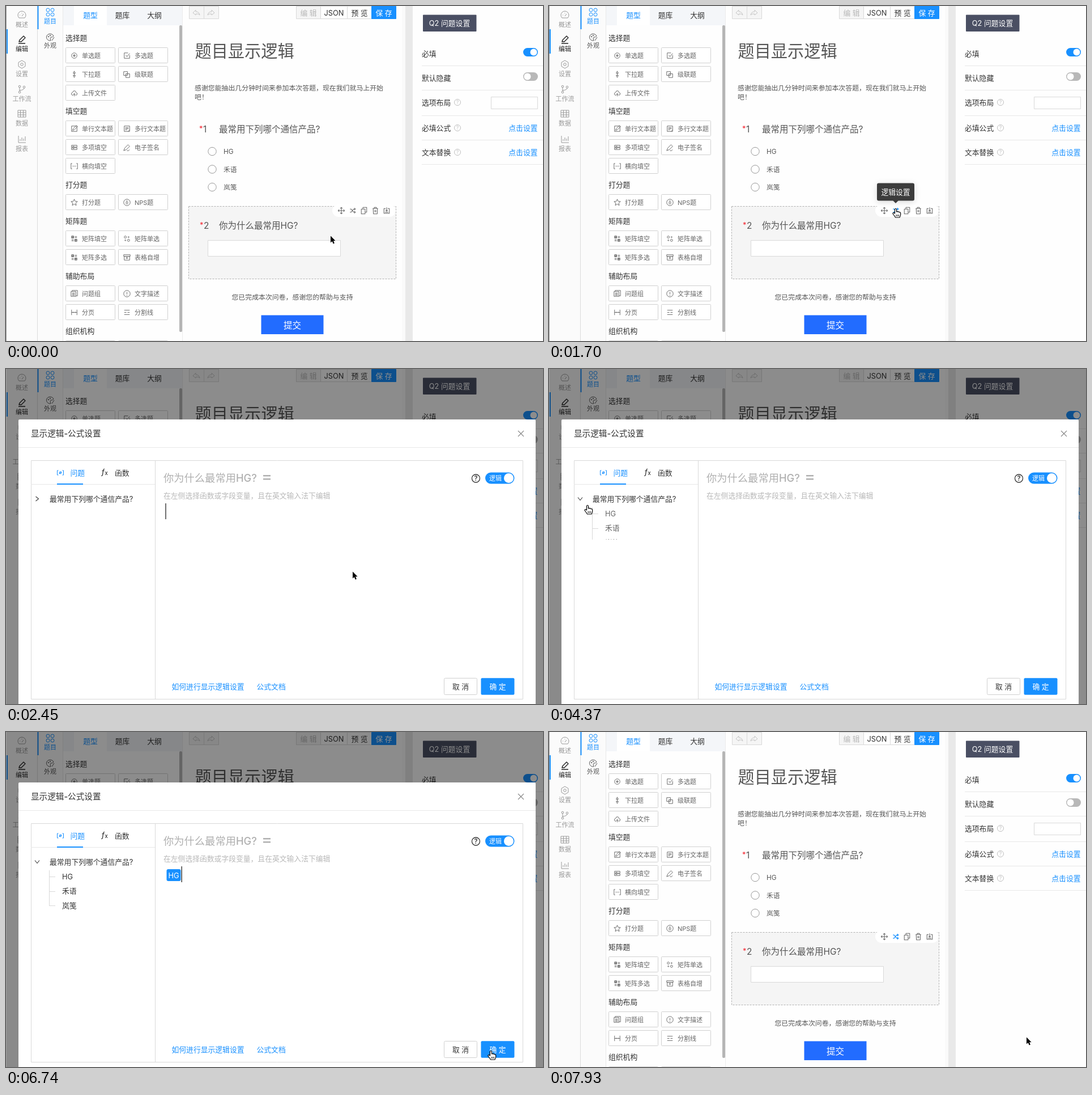
An HTML page with a canvas for the animation above (8000 ms loop, 948 by 591 pixels).

```html
<!DOCTYPE html>
<html lang="zh-CN">
<head>
<meta charset="utf-8">
<style>
  html, body { margin: 0; width: 100%; height: 100%; overflow: hidden; background: #fff; }
  canvas { display: block; width: 948px; height: 591px; }
</style>
</head>
<body>
<canvas id="stage"></canvas>
<script>
const LOOP = 8000, W = 948, H = 591;
const BLUE = '#1890ff', INK = '#333', SOFT = '#666', RULE = '#e8e8e8', EDGE = '#d0d0d0';
const FONT = '"Inter", "Noto Sans CJK SC", "Noto Sans CJK", sans-serif';
const PRODUCTS = ['HG', '禾语', '岚笺'];
const Q1 = '最常用下列哪个通信产品?', Q2 = `你为什么最常用${PRODUCTS[0]}?`;

const canvas = document.getElementById('stage');
const ctx = canvas.getContext('2d');
const ratio = window.devicePixelRatio || 1;
canvas.width = W * ratio;
canvas.height = H * ratio;

// ---------- drawing helpers ----------
function text(s, x, y, { size = 12.8, color = INK, align = 'left', weight = 400, style = 'normal' } = {}) {
  ctx.font = `${style} ${weight} ${size}px ${FONT}`;
  ctx.fillStyle = color;
  ctx.textAlign = align;
  ctx.fillText(s, x, y + size * 0.37);
}
function box(x, y, w, h, fill, stroke, radius = 0) {
  ctx.beginPath();
  ctx.roundRect(x, y, w, h, radius);
  if (fill) { ctx.fillStyle = fill; ctx.fill(); }
  if (stroke) { ctx.strokeStyle = stroke; ctx.lineWidth = 1; ctx.stroke(); }
}
const hline = (x, y, w, color = RULE) => box(x, y, w, 1, color);
const vline = (x, y, h, color = RULE) => box(x, y, 1, h, color);
function shape(d, x, y, { stroke, fill, width = 1, scale = 1 } = {}) {
  const path = new Path2D(d);
  ctx.save();
  ctx.translate(x, y);
  ctx.scale(scale, scale);
  ctx.lineWidth = width;
  ctx.lineJoin = 'round';
  if (fill) { ctx.fillStyle = fill; ctx.fill(path); }
  if (stroke) { ctx.strokeStyle = stroke; ctx.stroke(path); }
  ctx.restore();
}
const ring = (x, y, r) => `M${x - r} ${y}a${r} ${r} 0 1 0 ${2 * r} 0a${r} ${r} 0 1 0 ${-2 * r} 0`;
const rect = (x, y, w, h = w) => `M${x} ${y}h${w}v${h}h${-w}z`;
const disc = (x, y, r, fill) => shape(ring(0, 0, r), x, y, { fill });
function toggle(x, y, w, h, on) {
  box(x, y, w, h, on ? BLUE : '#b8b8b8', null, h / 2);
  disc(on ? x + w - h / 2 : x + h / 2, y + h / 2, h / 2 - 1.5, '#fff');
}
function help(x, y, r, color) {
  shape(ring(0, 0, r), x, y, { stroke: color, width: r > 6 ? 1.3 : 1 });
  text('?', x, y, { size: r * 1.6, color, align: 'center', weight: r > 6 ? 600 : 400 });
}

const ICON = {
  gauge: 'M-5 5A7 7 0 1 1 5 5ZM0 2L3-2M-4 0h1M0-4v1',
  pen: 'M-5 4L-4 1L3-6L6-3L-1 4ZM-6 7H6',
  gear: 'M0-7L6-3.5V3.5L0 7L-6 3.5V-3.5Z' + ring(0, 0, 2.3),
  branch: ring(-4, -5, 1.8) + ring(-4, 5, 1.8) + ring(4, -4, 1.8) + 'M-4-3V3M4-2Q4 1-4 2',
  table: rect(-7, -6, 14, 12) + 'M-7-2H7M-7 2H7M-2.5-6V6M2.5-6V6',
  chart: 'M-6-6V6H7M-3 3V0M0 3V-3M3 3V-1M6 3V-5',
  four: ring(-4, -4, 3) + ring(4, -4, 3) + ring(-4, 4, 3) + ring(4, 4, 3),
  palette: 'M1 6A6.5 6 0 1 1 6-2Q5 0 2 0T1 6' + ring(-3, -1, .8) + ring(0, -3, .8) + 'M7 0L3 6',
  radio: ring(0, 0, 5) + ring(0, 0, 1.7) + ring(0, 0, .8),
  check: 'M5-1V5H-5V-5H2M-2-1L0 2L5-4',
  sort: 'M0-6L2-2H-2ZM0 6L2 2H-2ZM0-2V2',
  cascade: rect(-6, -5, 7) + rect(-2, -1, 7),
  cloud: 'M-2 4H-4Q-6 3-5 0Q-4-1-3-1Q-2-5 1-4Q3-4 3-1Q7 0 5 3Q4 4 2 4M0 6V1M-2 3L0 1L2 3',
  edit: rect(-5, -5, 10) + 'M-3 3L-2 0L4-6L6-4L0 2Z',
  note: rect(-5, -5, 10) + 'M-3-2H3M-3 0H3M-3 2H0M2 5L5 2',
  fields: rect(-5, -4, 10, 3.5) + rect(-5, .5, 10, 3.5) + 'M-3-2H0M-3 2H0',
  sign: 'M-6 6L-4 1L2-5L5-2L-1 4ZM0 6H3L5 4',
  dots: 'M-4-5H-6V5H-4M4-5H6V5H4M-3 0h1.5M-.7 0h1.5M1.7 0h1.5',
  star: 'M0-6L1.7-2L6-1.6L2.7 1.2L3.7 5.5L0 3.2L-3.7 5.5L-2.7 1.2L-6-1.6L-1.7-2Z',
  dial: ring(0, 0, 6) + ring(0, 1, 1.8) + 'M0-4V-1',
  cells: rect(-5, -5, 4) + rect(-4, -4, 2) + rect(1, 1, 4) + rect(2, 2, 2) + 'M1-4H5M1-2H5M-5 2H-1M-5 4H-1',
  circles: ring(-3, -3, 2) + ring(3, 3, 2) + ring(3, -3, 1) + ring(-3, 3, 1),
  rows: rect(-6, -5, 12, 3) + rect(-5, -2, 10, 7) + 'M-2 1H2M0-1V3',
  group: rect(-6, -4, 9) + 'M-4-4V-6H6V4H3M-4-1H1M-4 1H1M-4 3H1',
  info: ring(0, 0, 6) + 'M0-3V1M0 2.5V4',
  page: 'M-5-5V5M5-5V5M-5 0H5M-2-1V1M2-1V1',
  lines: 'M-5-4H5M-5 0H-1M1 0H5M-5 4H5',
  move: 'M-6 0H6M0-6V6M-4-2L-6 0L-4 2M4-2L6 0L4 2M-2-4L0-6L2-4M-2 4L0 6L2 4',
  shuffle: 'M-5-3H-3L2 3H5M-5 3H-3L2-3H5M3-5L5-3L3-1M3 1L5 3L3 5',
  copy: rect(-5, -3, 7, 9) + 'M-2-3V-6H5V3H2',
  trash: 'M-5-4H5M-2-4V-6H2V-4M-4-4L-3.5 6H3.5L4-4M-1-1V3M1-1V3',
  store: 'M-2-4H-5V5H5V-4H2M0-6V1M-2-1L0 1L2-1M-3 3H3',
  back: 'M-1-5L-6 0L-1 4V2Q4 1 6 4Q5-2-1-2Z',
  forward: 'M1-5L6 0L1 4V2Q-4 1-6 4Q-5-2 1-2Z',
  brackets: 'M-3.5-4H-5.5V4H-3.5M3.5-4H5.5V4H3.5M2-2L-2 2' + ring(0, 0, 1.8),
  cross: 'M-5-5L5 5M5-5L-5 5',
  right: 'M-2.5-4L2.5 0L-2.5 4',
  down: 'M-4-2.5L0 2.5L4-2.5',
};
const ARROW = 'M0 0V14L3.2 11L5.5 16.2L8 15.2L5.8 10.2H10Z';
const HAND = 'M-1.5 9V1.5Q0-1 1.5 1.5V6Q3 4.5 4 6.2Q5.5 5 6.3 7Q8.5 6 8.7 9V11Q8.5 13 7 16H-.5L-2 13.5L-5 9.5Q-5 7-3 8Z';

// ---------- editor page ----------
const NAV = [['gauge', '概述', 16], ['pen', '编辑', 59], ['gear', '设置', 103],
  ['branch', '工作流', 147], ['table', '数据', 190], ['chart', '报表', 235]];
const GROUPS = [
  [56, '选择题', 'radio 单选题,check 多选题,sort 下拉题,cascade 级联题,cloud 上传文件'],
  [185, '填空题', 'edit 单行文本题,note 多行文本题,fields 多项填空,sign 电子签名,dots 横向填空'],
  [315, '打分题', 'star 打分题,dial NPS题'],
  [379, '矩阵题', 'cells 矩阵填空,circles 矩阵单选,cells 矩阵多选,rows 表格自增'],
  [476, '辅助布局', 'group 问题组,info 文字描述,page 分页,lines 分割线'],
  [573, '组织机构', 'group 部门,info 成员'],
];

function drawNavigation() {
  box(0, 0, 100, H, '#fbfbfb');
  vline(0, 0, H, '#a0a0a0');
  vline(55, 0, H, '#dcdcdc');
  vline(100, 0, H, RULE);
  box(1, 41, 2, 43, BLUE);
  box(55.5, 0, 2, 41, BLUE);
  NAV.forEach(([icon, label, y], i) => {
    const color = i === 1 ? '#222' : '#999';
    shape(ICON[icon], 28, y, { stroke: color, width: i === 1 ? 1.4 : 1 });
    text(label, 28, y + 17, { size: 11, color, align: 'center' });
  });
  shape(ICON.four, 78, 11, { stroke: BLUE });
  text('题目', 78, 27, { size: 11, color: BLUE, align: 'center' });
  shape(ICON.palette, 78, 55, { stroke: '#555' });
  text('外观', 78, 70, { size: 11, color: '#555', align: 'center' });
}

function drawPalette() {
  box(101, 0, 210, 34, '#f4f6f9');
  box(120, 0, 58, 34, '#fff');
  ['题型', '题库', '大纲'].forEach((s, i) =>
    text(s, 149 + i * 56.5, 16, { align: 'center', color: i ? INK : BLUE }));
  for (const [y, title, items] of GROUPS) {
    text(title, 105, y);
    items.split(',').forEach((item, i) => {
      const [icon, label] = item.split(' ');
      const x = 105.5 + (i % 2) * 93, top = y + 17.5 + (i >> 1) * 33;
      box(x, top, 87, 27, '#fff', EDGE, 1);
      shape(ICON[icon], x + 15, top + 14, { stroke: SOFT, scale: 0.95 });
      text(label, x + 28.5, top + 14.5, { size: 11, color: SOFT });
    });
  }
  box(306, 34, 5, 541, '#b5b5b5', null, 2);
  vline(311, 0, H, '#ececec');
}

function drawForm(linked) {
  box(323.5, .5, 26, 22, '#f5f5f5', '#d9d9d9');
  box(349.5, .5, 26, 22, '#f5f5f5', '#d9d9d9');
  shape(ICON.back, 336, 12, { stroke: '#c4c4c4' });
  shape(ICON.forward, 362, 12, { stroke: '#c4c4c4' });
  const tools = [[512, 43, '编 辑'], [555, 47, 'JSON'], [602, 43, '预 览'], [645, 43, '保 存']];
  tools.forEach(([x, w, label], i) => {
    box(x + .5, .5, w, 22, ['#f5f5f5', '#fff', '#fff', BLUE][i], i === 3 ? BLUE : '#d9d9d9');
    text(label, x + w / 2 + .5, 12, { align: 'center', color: ['#b8b8b8', INK, INK, '#fff'][i] });
  });

  text('题目显示逻辑', 333.5, 79, { size: 29.2, color: '#555' });
  text('感谢您能抽出几分钟时间来参加本次答题，现在我们就马上开始', 333, 145, { size: 11.9, color: '#555' });
  text('吧！', 333, 161, { size: 11.9, color: '#555' });

  const question = (n, label, x, y) => {
    text('*', x, y - .5, { size: 12.8, color: '#f5222d' });
    text(n, x + 7, y, { size: 15.5, color: '#555' });
    text(label, 376, y + .5, { size: 15.5, color: '#555' });
  };
  question('1', Q1, 341, 217);
  PRODUCTS.forEach((name, i) => {
    const y = 256.5 + i * 31.5;
    shape(ring(0, 0, 7.2), 364, y, { fill: '#fff', stroke: '#999' });
    text(name, 384, y + .5, { size: 11.8, color: '#555' });
  });

  ctx.setLineDash([3, 2]);
  box(322.5, 353.5, 366, 128, '#f5f5f5', '#b0b0b0');
  ctx.setLineDash([]);
  box(576, 350, 112, 22, '#fff', null, 11);
  ['move', 'shuffle', 'copy', 'trash', 'store'].forEach((icon, i) => {
    const active = i === 1 && linked;
    shape(ICON[icon], 592 + i * 20, 361, { stroke: active ? BLUE : '#666', width: active ? 1.4 : 1.1, scale: .95 });
  });
  question('2', Q2, 342, 387);
  box(356.5, 413.5, 234, 28, '#fff', '#d9d9d9');

  text('您已完成本次问卷，感谢您的帮助与支持', 505.5, 514, { size: 11.9, color: '#555', align: 'center' });
  box(450.5, 545.5, 110, 33.5, '#226cff');
  text('提交', 505.5, 563, { size: 15.5, color: '#fff', align: 'center' });
}

function drawSettings() {
  box(699, 0, 6, H, '#fafafa');
  box(705, 0, 13, H, '#e9e9e9');
  box(736, 15.5, 94.5, 29.5, '#4a4f63', null, 1);
  text('Q2 问题设置', 783, 30.5, { color: '#fff', align: 'center' });
  ['必填', '默认隐藏', '选项布局', '必填公式', '文本替换'].forEach((label, i) => {
    const y = [84, 127, 170, 215, 258][i];
    text(label, 734, y);
    hline(734, [105, 148, 193, 236, 279][i], 214);
    if (i > 1) help(797, y, 5.5, '#c0c0c0');
    if (i > 2) text('点击设置', 938.5, y, { color: BLUE, align: 'right' });
  });
  toggle(913, 74, 26, 15, true);
  toggle(913, 117, 26, 15, false);
  box(856.5, 160.5, 82, 21, '#fff', '#d9d9d9');
}

// ---------- dialog ----------
function drawTree(t) {
  const open = t >= 4370;
  shape(open ? ICON.down : ICON.right, 55, 229, { stroke: '#444', width: 1.2 });
  text(Q1, 77, 229.5);
  if (t < 4220) return;
  const bottom = t < 4370 ? 262 : t < 4520 ? 301 : 320;
  ctx.save();
  ctx.beginPath();
  ctx.rect(44, 240, 218, bottom - 240);
  ctx.clip();
  vline(76, 244, 63, '#d9d9d9');
  PRODUCTS.forEach((name, i) => {
    const y = 255 + i * 25.6;
    hline(77, Math.round(y), 10, '#d9d9d9');
    text(name, 99, y, { color: t < 4520 ? '#666' : INK });
  });
  ctx.restore();
}

// The caret blinks every 530 ms while the editor holds focus.
function caretVisible(t) {
  const since = t >= 5260 ? t - 5260 : t < 3920 ? t - 2300 : -1;
  return since >= 0 && t < 6890 && Math.floor(since / 530) % 2 === 0;
}

function drawDialog(t) {
  box(22, 89, 913, 516, '#fff', null, 2);
  text('显示逻辑-公式设置', 44, 114, { size: 14.6, weight: 500 });
  shape(ICON.cross, 909, 114, { stroke: '#888', width: 1.1 });
  hline(22, 138, 913);
  box(44.5, 161.5, 868, 421, null, '#d9d9d9');
  vline(263, 162, 420, '#d9d9d9');

  shape(ICON.brackets, 96, 183, { stroke: BLUE });
  text('问题', 113.5, 183, { color: BLUE });
  text('f', 169, 181.5, { size: 12, weight: 500, style: 'italic' });
  text('x', 174.5, 183.5, { size: 9.5, weight: 500 });
  text('函数', 192, 183);
  hline(44, 203, 219);
  // The tab underline grows to full width once the dialog is open.
  box(90, 202, t < 2450 ? 17 : 46, 2, BLUE);
  drawTree(t);

  text(Q2, 278, 192, { size: 18.3, color: '#b0b0b0', weight: 500 });
  box(454, 187, 13, 2.5, '#b0b0b0');
  box(454, 193, 13, 2.5, '#b0b0b0');
  text('在左侧选择函数或字段变量，且在英文输入法下编辑', 278, 223, { color: '#b8b8b8' });
  help(829.5, 193, 7, INK);
  toggle(846, 182.5, 51.5, 20, true);
  text('逻辑', 853, 193, { size: 11, color: '#fff' });

  const filled = t >= 5260;
  if (filled) {
    box(283.5, 242, 25, 21, BLUE, null, 3);
    text(PRODUCTS[0], 296, 253, { color: '#fff', align: 'center' });
  }
  if (caretVisible(t)) box(filled ? 309.5 : 281.3, 237, 1.4, 28, '#333');

  text('如何进行显示逻辑设置', 292.5, 560, { color: BLUE });
  text('公式文档', 442.5, 560, { color: BLUE });
  box(773.5, 545.5, 58, 29, '#fff', '#d0d0d0', 2);
  text('取 消', 802.5, 560.5, { align: 'center' });
  box(838.5, 545.3, 59, 29.4, t >= 6890 ? '#40a9ff' : BLUE, null, 2);
  text('确 定', 868, 560.5, { color: '#fff', align: 'center' });
}

// Scale, dialog opacity and mask opacity; the dialog zooms around the clicked icon.
function dialogState(t) {
  if (t < 2300 || t >= 7630) return null;
  if (t < 2450) return [.871, .84, .19];
  if (t < 7340) return [1, 1, .45];
  return t < 7490 ? [.88, .6, .32] : [.5, .15, .1];
}

function drawTooltip(alpha) {
  ctx.save();
  ctx.globalAlpha = alpha;
  ctx.shadowColor = 'rgba(0,0,0,.15)';
  ctx.shadowBlur = 12 * ratio;
  ctx.shadowOffsetY = 2 * ratio;
  box(579, 312.5, 66, 31, '#3c3c3c', null, 3);
  ctx.shadowColor = 'transparent';
  shape('M-5 0H5L0 5Z', 612, 343, { fill: '#3c3c3c' });
  text('逻辑设置', 612, 328, { color: '#fff', align: 'center' });
  ctx.restore();
}

// ---------- pointer ----------
const POINTER = [[350, 573, 405], [650, 365, 397], [1250, 655, 360], [1400, 624, 359], [1550, 612, 357],
  [2890, 612, 357], [3920, 56, 235], [4220, 56, 235], [4370, 68, 240], [4810, 98, 252], [5410, 98, 252],
  [6590, 808, 549], [6740, 856, 562], [7040, 868, 564], [7780, 868, 564], [7930, 843, 538]];

function drawPointer(t) {
  const next = POINTER.findIndex(k => k[0] > t);
  const b = POINTER[next < 0 ? POINTER.length - 1 : next];
  const a = next > 0 ? POINTER[next - 1] : b;
  const p = a === b ? 0 : (t - a[0]) / (b[0] - a[0]);
  const e = p * p * (3 - 2 * p);
  const x = a[1] + (b[1] - a[1]) * e, y = a[2] + (b[2] - a[2]) * e;
  const hand = (t >= 1400 && t < 2300) || (t >= 3920 && t < 5700) || (t >= 6740 && t < 7340);
  if (hand) {
    shape(HAND, x, y, { fill: '#fff', stroke: '#000', width: 1.2 });
    shape('M1 11V14M3.2 11V14M5.4 11V14', x, y, { stroke: '#000', width: .9 });
  } else {
    shape(ARROW, x, y + .5, { stroke: '#fff', width: 2, scale: .86 });
    shape(ARROW, x, y + .5, { fill: '#000', scale: .86 });
  }
}

// ---------- timeline: first step, last step, number of steps ----------
const RUNS = [[500, 1400, 7], [1550, 1700, 2], [2300, 2740, 4], [3040, 3920, 7], [4220, 4810, 5],
  [5260, 5260, 1], [5560, 6590, 8], [6740, 7040, 3], [7340, 7630, 3], [7930, 7930, 1]];

function heldTime(t) {
  const run = RUNS.filter(r => r[0] <= t).pop();
  if (!run) return 0;
  const [start, end, count] = run;
  if (t >= end) return end;
  const step = (end - start) / (count - 1);
  // Steps fall on a 10 ms grid, rounded up.
  const at = k => start + Math.ceil(step * k / 10 - 1e-6) * 10;
  let k = 0;
  while (k < count - 1 && at(k + 1) <= t) k++;
  return at(k);
}

function draw(t) {
  ctx.setTransform(ratio, 0, 0, ratio, 0, 0);
  box(0, 0, W, H, '#fefefe');
  drawNavigation();
  drawPalette();
  drawForm(t >= 1400);
  drawSettings();

  const dialog = dialogState(t);
  if (dialog) {
    const [scale, alpha, mask] = dialog;
    box(1, 0, W, H, `rgba(0,0,0,${mask})`);
    ctx.save();
    ctx.globalAlpha = alpha;
    ctx.translate(612, 360);
    ctx.scale(scale, scale);
    ctx.translate(-612, -360);
    drawDialog(t);
    ctx.restore();
  }
  if (t >= 1400 && t < 2450) drawTooltip(t < 1550 ? .4 : t < 1700 ? .8 : 1);
  drawPointer(t);
}

function frame() {
  draw(heldTime(performance.now() % LOOP));
  requestAnimationFrame(frame);
}
frame();
</script>
</body>
</html>
```
